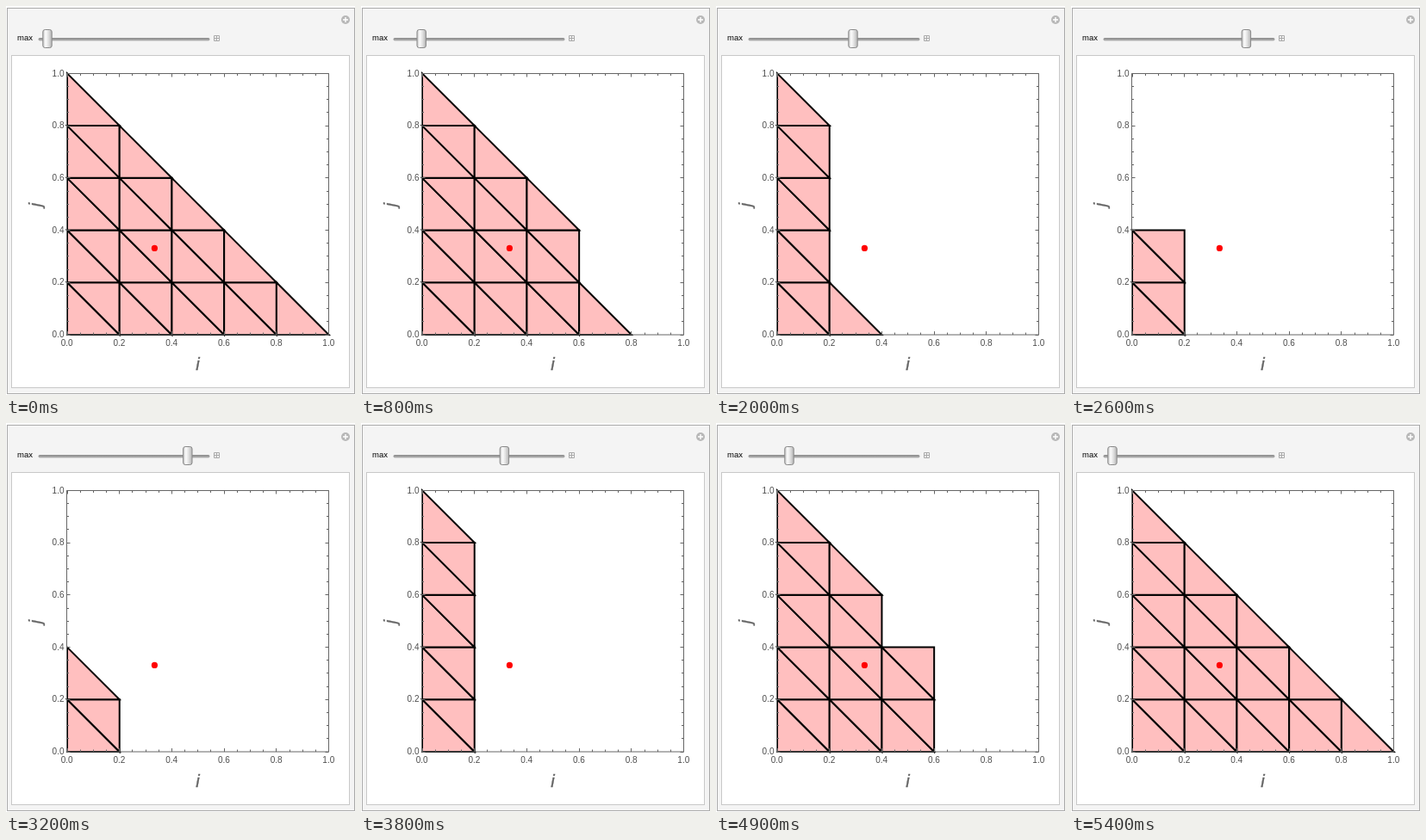
An HTML page for the animation above (6000 ms loop, 405 by 452 pixels).

```html
<!DOCTYPE html>
<html>
<head>
<meta charset="utf-8">
<style>
html, body { margin: 0; width: 100%; height: 100%; overflow: hidden; background: #fff; }
svg { display: block; font-family: "Liberation Sans", Arial, sans-serif; }
</style>
</head>
<body>
<svg width="405" height="452" viewBox="0 0 405 452">
  <defs>
    <linearGradient id="metal">
      <stop offset="0" stop-color="#c4c4c4"/>
      <stop offset=".3" stop-color="#fcfcfc"/>
      <stop offset=".6" stop-color="#e2e2e2"/>
      <stop offset="1" stop-color="#b4b4b4"/>
    </linearGradient>
    <linearGradient id="groove" x2="0" y2="1">
      <stop offset="0" stop-color="#888"/>
      <stop offset="1" stop-color="#b4b4b4"/>
    </linearGradient>
  </defs>
  <rect x="1.5" y="2.5" width="403" height="448" fill="#f4f4f4" stroke="#aaa"/>
  <rect x="6.5" y="57.5" width="392" height="386" fill="#fff" stroke="#c8c8c8"/>
  <circle cx="394" cy="16" r="5" fill="#b8b8b8"/>
  <path d="M391 16h6M394 13v6" stroke="#fff" stroke-width="1.4"/>
  <text x="13" y="40" font-size="9.5">max</text>
  <rect x="37.5" y="37" width="199" height="3.4" rx="1.7" fill="url(#groove)"/>
  <path d="M241.5 34.5h6v6h-6zM241.5 37.5h6M244.5 34.5v6" fill="none" stroke="#aaa"/>
  <rect id="thumb" x="-5.2" y="27.5" width="10.4" height="21" rx="2.5" fill="url(#metal)" stroke="#888"/>
  <g id="mesh" fill="#ffbfbf" stroke="#000" stroke-width="2"></g>
  <circle cx="172.4" cy="281.4" r="3.6" fill="#f00"/>
  <path id="frame" fill="none" stroke="#666" stroke-width="1"/>
  <g id="labels" font-size="10" fill="#4d4d4d"></g>
  <g font-size="20" font-style="italic" fill="#666" stroke="#666" stroke-width=".4" text-anchor="middle">
    <text x="222.5" y="423">i</text>
    <text transform="translate(41 231) rotate(-90)">j</text>
  </g>
</svg>
<script>
const NS = "http://www.w3.org/2000/svg";
const LEFT = 71, BASE = 382, SIZE = 303.6, N = 5;
const LOOP = 6000, STEP = 100;
const $ = id => document.getElementById(id);
const px = u => LEFT + u * SIZE;
const py = v => BASE - v * SIZE;

function add(parent, tag, attrs, text = "") {
  const el = document.createElementNS(NS, tag);
  for (const key in attrs) el.setAttribute(key, attrs[key]);
  el.textContent = text;
  parent.appendChild(el);
  return el;
}

// Column by column, bottom to top, alternating lower and upper halves.
const triangles = [];
function triangle(...corners) {
  const points = corners.map(([i, j]) => px(i / N) + "," + py(j / N)).join(" ");
  triangles.push(add($("mesh"), "polygon", { points }));
}
for (let i = 0; i < N; i++) {
  for (let j = 0; i + j < N; j++) {
    triangle([i, j], [i + 1, j], [i, j + 1]);
    if (i + j < N - 1) triangle([i + 1, j], [i + 1, j + 1], [i, j + 1]);
  }
}

function drawAxes() {
  const x0 = 70.5, x1 = 374.5, y0 = 382, y1 = 78.5;
  let d = `M${x0} ${y1}H${x1}V${y0}H${x0}Z`;
  for (let k = 0; k <= 20; k++) {
    const major = k % 4 === 0, len = major ? 4 : 2.5;
    const x = Math.floor(px(k / 20)) + 0.5, y = Math.floor(py(k / 20)) + 0.5;
    d += `M${x} ${y0}v${-len}M${x} ${y1}v${len}M${x0} ${y}h${len}M${x1} ${y}h${-len}`;
    if (!major) continue;
    const label = (k / 20).toFixed(1);
    add($("labels"), "text", { x: px(k / 20) - 0.3, y: 395, "text-anchor": "middle" }, label);
    add($("labels"), "text", { x: 67.5, y: py(k / 20) + 3.2, "text-anchor": "end" }, label);
  }
  $("frame").setAttribute("d", d);
}

function removedAt(t) {
  const last = triangles.length - 1;
  const down = Math.floor((t - 500) / STEP);
  const up = Math.floor((5400 - t) / STEP + 0.999999);
  return Math.max(0, Math.min(last, down, up));
}

function render(t) {
  const removed = removedAt(t);
  const shown = triangles.length - removed;
  triangles.forEach((el, k) => el.setAttribute("display", k < shown ? "inline" : "none"));
  $("thumb").setAttribute("transform", `translate(${48 + 7.4 * removed} 0)`);
}

drawAxes();
render(0);
const start = performance.now();
function tick(now) {
  render(Math.max(0, now - start) % LOOP);
  requestAnimationFrame(tick);
}
requestAnimationFrame(tick);
</script>
</body>
</html>
```
